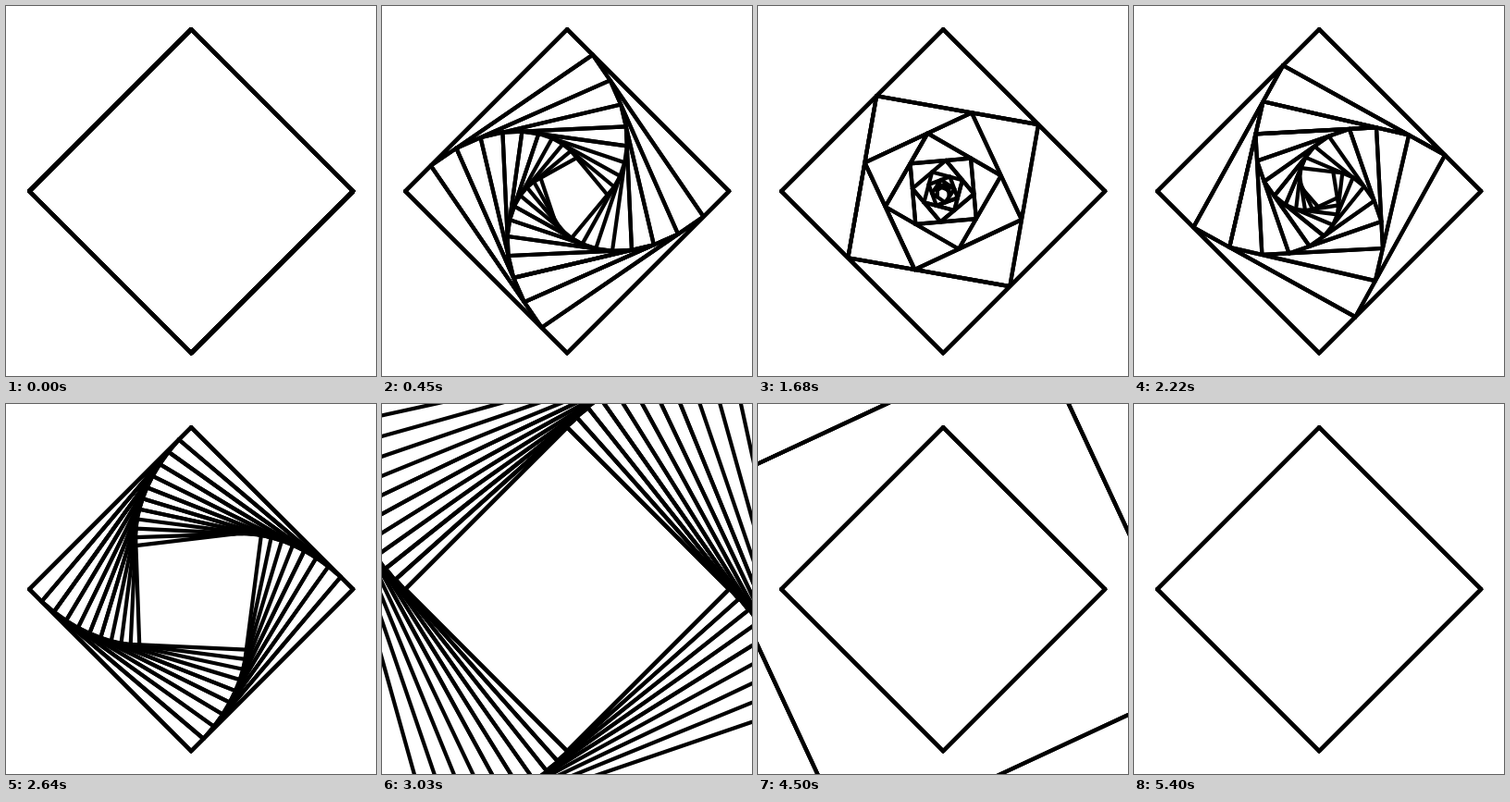
These frames come from a looping animation (400x400 px, 5930 ms). An HTML page with a canvas:

```html
<!DOCTYPE html>
<html lang="en">
<head>
<meta charset="utf-8">
<title>Nested interpolation</title>
<style>
  html, body { margin: 0; width: 100%; height: 100%; overflow: hidden; background: #fff; }
  canvas { display: block; }
</style>
</head>
<body>
<canvas id="stage" width="400" height="400"></canvas>
<script>
const ctx = document.getElementById('stage').getContext('2d');
const LOOP = 5930, STEP = 30, LAST_STEP = 180, RATE = 0.0105;
const CENTER = 200.2, RADIUS = 175, EDGES = 12;

// Control points walk three times around a square.
const control = Array.from({ length: EDGES + 1 }, (_, i) => {
  const angle = i * Math.PI / 2;
  return [CENTER + RADIUS * Math.cos(angle), CENTER + RADIUS * Math.sin(angle)];
});

const mix = (a, b, t) => a + (b - a) * t;

function drawEdge(p, q) {
  ctx.beginPath();
  ctx.moveTo(p[0], p[1]);
  ctx.lineTo(q[0], q[1]);
  ctx.stroke();
}

// De Casteljau scheme: every level has one point fewer than the level before.
function drawScheme(t) {
  ctx.fillStyle = '#fff';
  ctx.fillRect(0, 0, 400, 400);
  ctx.strokeStyle = '#000';
  ctx.lineWidth = 4.2;
  ctx.lineCap = 'round';
  let points = control;
  while (points.length > 1) {
    const next = [];
    for (let i = 0; i + 1 < points.length; i++) {
      const p = points[i], q = points[i + 1];
      drawEdge(p, q);
      next.push([mix(p[0], q[0], t), mix(p[1], q[1], t)]);
    }
    points = next;
  }
}

function tick() {
  const step = Math.min(LAST_STEP, Math.floor(performance.now() % LOOP / STEP));
  drawScheme(step * RATE);
  requestAnimationFrame(tick);
}
tick();
</script>
</body>
</html>
```
